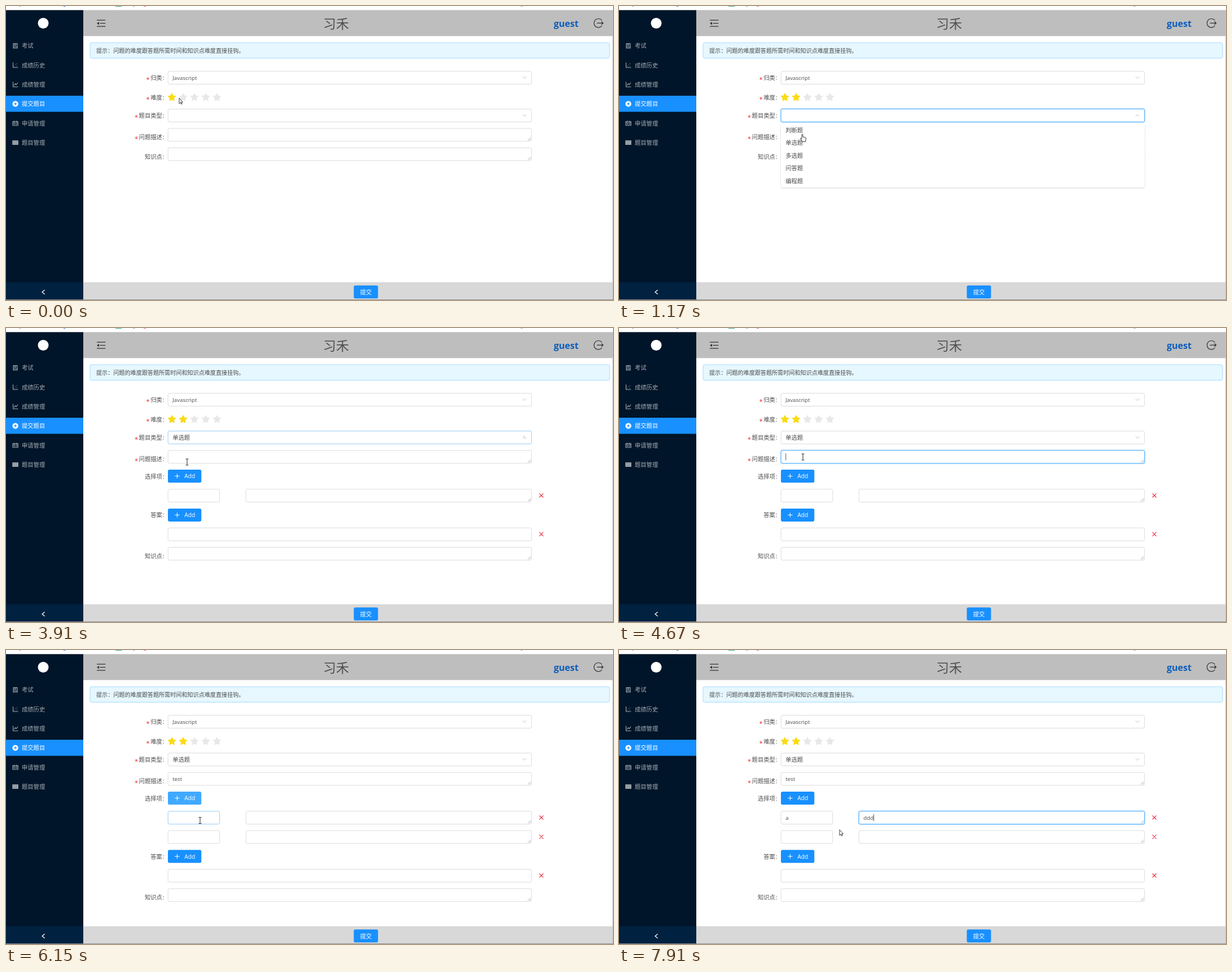
Write an HTML page that moves like this. It is 1076 by 521 pixels and loops after 8 s.

```html
<!DOCTYPE html>
<html lang="zh-CN">
<head>
<meta charset="utf-8">
<title>提交题目</title>
<style>
  html, body { margin: 0; width: 100%; height: 100%; overflow: hidden; background: #fff; }
  svg { display: block; width: 1076px; height: 521px; }
  text { font: 10.3px "Open Sans", "Noto Sans CJK SC", "Noto Sans CJK", sans-serif; fill: #4c4c4c; white-space: pre; }
  .latin { font-size: 9.7px; }
  .tip { font-size: 10.1px; }
  .star { fill: #f5222d; font-size: 11px; }
  .white { fill: #fff; }
  .title { font-size: 23px; fill: #505050; }
  .user { font-size: 16px; font-weight: 700; fill: #0c5cbc; }
  .menu text { fill: #a6adb4; }
  .menu .white { fill: #fff; }
  .line { fill: none; stroke-linecap: round; stroke-linejoin: round; }
</style>
</head>
<body>
<svg viewBox="0 0 1076 521">
  <defs>
    <path id="star" d="M0-6.3 1.9-2.2 6.2-1.7 3.1 1.4 3.8 5.8 0 3.7-3.8 5.8-3.1 1.4-6.2-1.7-1.9-2.2Z" stroke-width="1.6" stroke-linejoin="round"/>
    <path id="arrow" d="M0 0V10L2.2 8 3.7 11 5.2 10.3 3.8 7.4H6.4Z" fill="#fff" stroke="#222" stroke-width=".9"/>
    <path id="hand" d="M-1 1Q0-.6 1 1V5L5.2 5.9Q6.7 6.3 6.5 8L5.7 11V13.4H-.6V11.8L-3.5 7.6Q-3.3 6.2-1 8Z" fill="#fff" stroke="#222" stroke-width=".9" stroke-linejoin="round"/>
    <path id="beam" class="line" d="M-2-5.5H-.7L0-5 .7-5.5H2M0-5V5M-2 5.5H-.7L0 5 .7 5.5H2" stroke="#222" stroke-width="1"/>
    <path id="cross" class="line" d="M-3.2-3.2 3.2 3.2M3.2-3.2-3.2 3.2" stroke="#e8283c" stroke-width="1.1"/>
    <filter id="shade" x="-5%" y="-10%" width="110%" height="125%">
      <feDropShadow dx="0" dy="1" stdDeviation="1.2" flood-opacity=".2"/>
    </filter>
  </defs>

  <rect width="1076" height="521" fill="#fff"/>
  <g>
    <path d="M22 0h5l-2.5 1Z" fill="#8793a3"/>
    <path d="M101 0h5l-2.5 1.2Z" fill="#3478d8"/>
    <rect x="194" width="11" height="1" fill="#3aa78c"/>
    <path d="M225 0h3l-1.5 1Z" fill="#555"/>
    <path d="M243 0h6l-3 1.3Z" fill="#ec5f92"/>
    <path d="M912 0h4l-2 1Z" fill="#777"/>
  </g>

  <rect y="7.3" width="137" height="513" fill="#001529"/>
  <rect y="489.5" width="137" height="31" fill="#002140"/>
  <rect x="137" y="7.3" width="939" height="46" fill="#bebebe"/>
  <rect x="137" y="489.5" width="939" height="31" fill="#d8d8d8"/>
  <rect y="520" width="1076" height="1" fill="#8d9094"/>
  <rect x="1075" y="7" width="1" height="513" fill="#c4c4c4"/>

  <circle cx="66" cy="30.5" r="9.5" fill="#fff"/>
  <path class="line" d="M161.5 25.2H175.8M167 30.7H175.8M161.5 36.2H175.8" stroke="#333" stroke-width="1.3"/>
  <path d="M161 30.7 165 28V33.4Z" fill="#333"/>
  <text class="title" x="562" y="39.6">习禾</text>
  <text class="user" x="971" y="36.5">guest</text>
  <path class="line" d="M1056 25.2A7.8 7.8 0 1 0 1056 35.4M1048 30.3H1058.4M1055.8 27.8 1058.6 30.3 1055.8 32.8" stroke="#333" stroke-width="1.2"/>

  <g class="menu">
    <rect y="159" width="137" height="28.5" fill="#1890ff"/>
    <g class="line" stroke="#a6adb4" stroke-width="1.1">
      <path d="M13 66.5H20V74.7H13ZM15 66.5V70H17.5V66.5M13 72.5H20"/>
      <path d="M12.5 100.5V109H21M15 106.5V106.6M17 103.5V103.6M19 106V106.1M19.5 102V102.1"/>
      <path d="M12.5 134.8V143.3H21M14.5 140.5 16.5 137.5 18.2 139.5 20.8 136"/>
      <path d="M12 204.8H21.2V211.8H12ZM12 207H21.2M14 209.4H16M18 209.4H19.5M14.5 203.8V205.5M18.8 203.8V205.5"/>
    </g>
    <circle cx="16.6" cy="173.4" r="5.2" fill="#fff"/>
    <path d="M14 173.4H19.2M16.6 170.8V176" stroke="#1890ff" stroke-width="1.1"/>
    <rect x="11.3" y="238.2" width="10.5" height="7.8" fill="#a6adb4"/>
    <path d="M12 240.5H21M12 243.5H21M14.5 239V245.5M18 239V245.5" stroke="#5c6874" stroke-width=".4"/>
    <text x="28" y="74.4">考试</text>
    <text x="28" y="108.7">成绩历史</text>
    <text x="28" y="143">成绩管理</text>
    <text class="white" x="28" y="177.3">提交题目</text>
    <text x="28" y="211.7">申请管理</text>
    <text x="28" y="246">题目管理</text>
  </g>
  <path class="line" d="M68.3 503.6 64 507 68.3 510.4" stroke="#fff" stroke-width="1.3"/>

  <rect x="149" y="65" width="921" height="27.5" rx="2.8" fill="#e6f7ff" stroke="#91d5ff" stroke-width=".8"/>
  <text class="tip" x="160" y="82.6">提示：问题的难度跟答题所需时间和知识点难度直接挂钩。</text>
  <rect x="616.5" y="495.3" width="43" height="23" rx="2.8" fill="#1890ff"/>
  <text class="white" x="627.7" y="510.7">提交</text>

  <g id="form"></g>
</svg>

<script>
const LOOP = 8000, LEFT = 287.2, RIGHT = 931.6, ROW = 34.3;
const KINDS = ['判断题', '单选题', '多选题', '问答题', '编程题'];
const form = document.getElementById('form');
const pen = document.createElement('canvas').getContext('2d');

// Each entry: time, pointer shape, x, y, and what else changes.
const timeline = [
  [0, 'arrow', 307, 163, { stars: 1, opts: 0, kind: '', desc: '', key: '', val: '' }],
  [150, 'hand', 311, 162, { stars: 2, pop: true }],
  [280, 'hand', 312, 163, { pop: false }],
  [420, 'hand', 316, 173],
  [540, 'hand', 319, 187, { hover: 'kind' }],
  [690, 'hand', 320, 191, { focus: 'kind', turn: 90 }],
  [810, 'hand', 321, 195, { open: .6, turn: 180 }],
  [930, 'hand', 322, 206, { open: 1, hover: '' }],
  [1050, 'hand', 324, 218],
  [1170, 'hand', 325, 227],
  [1290, 'hand', 322, 233, { hot: 1 }],
  [1410, 'hand', 316, 219],
  [1940, 'hand', 322, 233],
  [2090, 'hand', 322, 250],
  [2330, 'hand', 321, 249],
  [2450, 'hand', 320.5, 248],
  [2600, 'hand', 320, 247],
  [3910, 'beam', 321, 237.5, { open: 0, hot: -1, focus: '', hover: 'kind', turn: 45, kind: KINDS[1], opts: 1 }],
  [4030, 'beam', 321, 225, { hover: '', turn: 0 }],
  [4150, 'beam', 322, 215],
  [4400, 'beam', 324, 221, { hover: 'desc' }],
  [4530, 'beam', 326, 226, { focus: 'desc' }],
  [4670, 'beam', 326, 228.5, { caret: true }],
  [4790, 'beam', 326, 228.5, { desc: 't' }],
  [4910, 'beam', 328, 234, { desc: 'te' }],
  [5030, 'arrow', 333, 247, { desc: 'tes', hover: '' }],
  [5180, 'hand', 342, 257, { desc: 'test', add: true }],
  [5300, 'hand', 341, 259],
  [5420, 'hand', 340, 260],
  [5730, 'hand', 340, 260, { opts: 2, focus: '' }],
  [5880, 'beam', 342, 290, { hover: 'key' }],
  [6000, 'arrow', 344, 312, { hover: '' }],
  [6150, 'beam', 344, 302, { hover: 'key' }],
  [6270, 'beam', 344, 302, { focus: 'key', add: false }],
  [6540, 'beam', 350, 303, { key: 'a' }],
  [6660, 'arrow', 405, 298, { hover: '' }],
  [6780, 'beam', 470, 303, { hover: 'val' }],
  [6930, 'beam', 484, 303, { focus: 'val' }],
  [7200, 'beam', 488, 303],
  [7480, 'beam', 485, 302, { val: 'd' }],
  [7600, 'beam', 466, 304, { val: 'dd' }],
  [7760, 'beam', 446, 306],
  [7910, 'arrow', 391, 318.5, { val: 'ddd', hover: '' }]
];

let state = { hot: -1, turn: 0, open: 0 };
const scenes = timeline.map(([at, shape, x, y, change]) =>
  state = { ...state, ...change, at, shape, x, y });

const text = (x, y, value, cls = '') => `<text class="${cls}" x="${x}" y="${y + 3.8}">${value}</text>`;

function label(y, value, required) {
  const x = 276.8 - value.length * 10.3;
  return text(x, y, value) + text(277.8, y, ':') +
    (required ? text(x - 7.7, y + 3, '*', 'star') : '');
}

function field(s, id, x, y, w, value = '', area = false) {
  const focus = id && s.focus === id, hover = id && s.hover === id;
  const stroke = focus ? '#40a9ff' : hover ? '#8cc8f8' : '#d9d9d9';
  const rect = attrs => `<rect x="${x}" y="${y}" width="${w}" height="22.8" rx="2.6" ${attrs}/>`;
  let out = focus ? rect('fill="none" stroke="#1890ff" stroke-opacity=".25" stroke-width="3"') : '';
  out += rect(`fill="#fff" stroke="${stroke}" stroke-width=".9"`);
  if (area) {
    const r = x + w - 1.5, b = y + 21.3;
    out += `<path d="M${r - 5} ${b}l5-5M${r - 2.3} ${b}l2.3-2.3" stroke="#888" stroke-width=".7"/>`;
  }
  out += text(x + 8, y + 11.6, value, /^\w/.test(value) ? 'latin' : '');
  if (focus && s.caret && id !== 'kind') {
    pen.font = '9.7px "Open Sans", sans-serif';
    const at = x + 8.5 + pen.measureText(value).width;
    out += `<path d="M${at} ${y + 5}v12.5" stroke="#333" stroke-width=".8"/>`;
  }
  return out;
}

const chevron = (y, turn) =>
  `<path class="line" transform="translate(919 ${y}) rotate(${turn})" d="M-3-1.7 0 1.7 3-1.7" stroke="#bfbfbf" stroke-width=".9"/>`;

const cross = y => `<use href="#cross" x="949" y="${y}"/>`;

const addButton = (y, lit) =>
  `<rect x="287" y="${y}" width="59.3" height="23" rx="2.8" fill="${lit ? '#40a9ff' : '#1890ff'}"/>
   <path d="M299.3 ${y + 11.5}h8.2M303.4 ${y + 7.4}v8.2" stroke="#fff" stroke-width="1"/>` +
  text(316.3, y + 11.6, 'Add', 'white');

function stars(s) {
  return Array.from({ length: 5 }, (_, i) => {
    const color = i < s.stars ? '#fadb14' : '#e8e8e8', size = s.pop && i === 1 ? 1.1 : 1;
    return `<use href="#star" transform="translate(${294 + i * 20} 161.6) scale(${size})" fill="${color}" stroke="${color}"/>`;
  }).join('');
}

function choices(s) {
  if (!s.opts) return '';
  let out = label(262.7, '选择项') + addButton(251, s.add), y = 285.7;
  for (let i = 0; i < s.opts; i++, y += ROW) {
    out += field(s, i ? '' : 'key', LEFT, y, 91.5, i ? '' : s.key) +
      field(s, i ? '' : 'val', 425.3, y, RIGHT - 425.3, i ? '' : s.val, true) + cross(y + 11.1);
  }
  return out + label(y + 11.5, '答案') + addButton(y - .1) +
    field(s, '', LEFT, y + ROW, RIGHT - LEFT) + cross(y + ROW + 11.1);
}

function dropdown(s) {
  if (!s.open) return '';
  const rows = KINDS.map((kind, i) => {
    const y = 208.7 + i * 22.55;
    return (i === s.hot ? `<rect x="287" y="${y}" width="645" height="22.5" fill="#e6f7ff"/>` : '') +
      text(295.2, y + 11.3, kind);
  }).join('');
  return `<g opacity="${s.open}" transform="translate(0 ${208.7 * (1 - s.open)}) scale(1 ${s.open})">
    <rect x="287" y="208.7" width="645" height="112.8" rx="2.6" fill="#fff" filter="url(#shade)"/>${rows}</g>`;
}

function draw(s) {
  const w = RIGHT - LEFT, noteY = s.opts ? 354.3 + s.opts * ROW : 251.2;
  form.innerHTML =
    label(127.5, '归类', true) + field(s, '', LEFT, 115.7, w, 'Javascript') + chevron(127, 0) +
    label(162, '难度', true) + stars(s) +
    label(194.5, '题目类型', true) + field(s, 'kind', LEFT, 182.6, w, s.kind) + chevron(194, s.turn) +
    label(232.6, '问题描述', true) + field(s, 'desc', LEFT, 217, w, s.desc, true) +
    choices(s) +
    label(noteY + 15.6, '知识点') + field(s, '', LEFT, noteY, w, '', true) +
    dropdown(s) +
    `<use href="#${s.shape}" x="${s.x}" y="${s.y}"/>`;
}

let shown;
function tick() {
  const t = performance.now() % LOOP;
  const scene = scenes.findLast(s => s.at <= t);
  if (scene !== shown) draw(shown = scene);
  requestAnimationFrame(tick);
}
tick();
</script>
</body>
</html>
```
